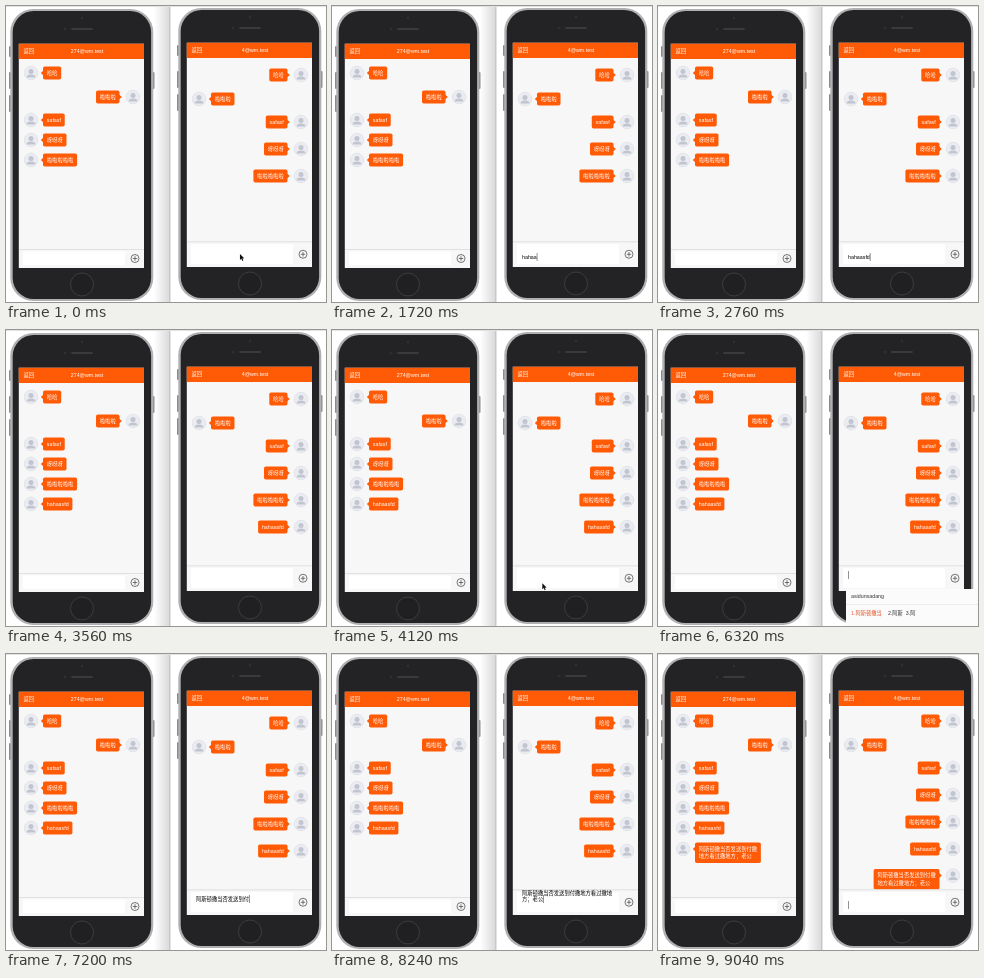
An HTML page with a canvas for the animation above (9.24 s loop, 320 by 296 pixels).

```html
<!DOCTYPE html>
<html lang="zh">
<head>
<meta charset="utf-8">
<style>
  html, body { margin: 0; width: 320px; height: 296px; overflow: hidden; background: #fff; }
  canvas { display: block; }
</style>
</head>
<body>
<canvas width="320" height="296"></canvas>
<script>
const ctx = document.querySelector('canvas').getContext('2d');
const LOOP = 9240, ORANGE = '#ff5a05', RIGHT_X = 168;
const LINES = ['阿斯顿撒当否发送到付撒', '地方看过撒地方；老公'];
const FULL = LINES.join('');

// Each message: lines, side on the left phone (mirrored on the right one), y on both phones, time sent
const messages = [
  [['哈哈'], 0, 67, 69],
  [['啦啦啦'], 1, 91, 93],
  [['safasf'], 0, 114, 116],
  [['呀呀呀'], 0, 134, 143],
  [['啦啦啦啦啦'], 0, 154, 170],
  [['hahaasfd'], 0, 174, 197, 3040],
  [LINES, 0, 195, 223.5, 8920],
];
const keyTimes = [1000, 1160, 1320, 1480, 1640, 2280, 2400, 2560];

// Pinyin compositions: start, end, letters, range of FULL, typing progress
const compositions = [
  [5360, 7200, 'asidunsadangfoufasongdaofu', 0, 10,
    [[5360, 1], [5520, 5], [6040, 6], [6400, 14], [6560, 15], [6600, 17], [6800, 18], [7160, 26]]],
  [7400, 7960, 'sadifangkanguosadifang', 10, 19, [[7400, 1], [7760, 22]]],
  [7960, 8200, 'laogong', 19, 21, [[7960, 1], [8160, 7]]],
];
const pointerPaths = [
  [0, 1000, [[0, 234, 248], [400, 216, 248], [840, 201, 247]]],
  [3600, 5360, [[3600, 232, 262], [4320, 202, 250], [4800, 201, 247]]],
];

function track(t, keys, column = 1) {
  const i = keys.findIndex(k => k[0] > t);
  if (i < 0) return keys[keys.length - 1][column];
  if (i === 0) return keys[0][column];
  const a = keys[i - 1], b = keys[i];
  return a[column] + (b[column] - a[column]) * (t - a[0]) / (b[0] - a[0]);
}

function box(x, y, w, h, color, r = 0) {
  ctx.fillStyle = color;
  ctx.beginPath();
  ctx.roundRect(x, y, w, h, r);
  ctx.fill();
}

function disc(x, y, r, fill, stroke) {
  ctx.beginPath();
  ctx.arc(x, y, r, 0, 7);
  if (fill) { ctx.fillStyle = fill; ctx.fill(); }
  if (stroke) { ctx.strokeStyle = stroke; ctx.lineWidth = 0.8; ctx.stroke(); }
}

function polygon(points, fill, stroke) {
  ctx.beginPath();
  points.forEach(p => ctx.lineTo(...p));
  ctx.closePath();
  if (stroke) { ctx.strokeStyle = stroke; ctx.lineWidth = 1; ctx.stroke(); }
  ctx.fillStyle = fill;
  ctx.fill();
}

function label(text, x, y, color = '#fff', align = 'left') {
  ctx.fillStyle = color;
  ctx.textAlign = align;
  ctx.fillText(text, x, y);
}

function avatar(x, y) {
  disc(x, y, 6.8, '#eaecf1', '#dfe1e8');
  disc(x, y - 1.5, 2.5, '#c1c5d0');
  ctx.beginPath();
  ctx.ellipse(x, y + 4.4, 4.5, 3, 0, Math.PI, 0);
  ctx.fill();
}

function bubble(lines, outgoing, y) {
  const w = ctx.measureText(lines[0]).width + 7.6;
  const x = outgoing ? 113.5 - w : 37;
  const edge = outgoing ? 113 : 37.5, tip = outgoing ? 115.8 : 34.8;
  avatar(outgoing ? 127 : 25, y);
  box(x, y - 6.5, w, 13 + (lines.length - 1) * 7.5, ORANGE, 1.8);
  polygon([[edge, y - 2.5], [tip, y], [edge, y + 2.5]], ORANGE);
  lines.forEach((line, i) => label(line, x + 3.8, y + 0.5 + i * 7.5));
}

function phone(title, barTop, rows) {
  for (const [y, h] of [[40, 11], [66, 17], [89, 17]]) box(3, y, 2, h, '#8b8b8d', 1);
  box(146.5, 66, 2, 17, '#8b8b8d', 1);
  box(4.3, 3, 143, 292, '#b0b0b2', 23);
  box(6.7, 5, 138.4, 288, '#232325', 21);
  disc(76, 12, 1.3, '#303034');
  disc(59, 23, 1.6, '#2e2e33');
  box(65, 22, 22, 2, '#3a3a3c', 1);
  disc(76, 278.5, 11.5, '#202022', '#444446');
  box(12.8, 37.7, 125.2, 224.3, '#f7f7f7');
  box(12.8, 37.7, 125.2, 15.2, ORANGE);
  label('返回', 17.5, 46);
  label(title, 81, 46, '#fff', 'center');

  ctx.save();
  ctx.beginPath();
  ctx.rect(13, 53, 125, barTop - 53);
  ctx.clip();
  rows();
  ctx.restore();

  const mid = (barTop + 262) / 2;
  box(13, barTop, 125, 0.8, '#d8d8da');
  box(17, barTop + 2.5, 102, 256.5 - barTop, '#fff', 1);
  disc(129, mid, 4, null, '#555');
  box(126.8, mid - 0.4, 4.4, 0.8, '#555');
  box(128.6, mid - 2.2, 0.8, 4.4, '#555');
}

function inputText(t) {
  const entered = keyTimes.filter(k => k <= t).length;
  const latin = t < 3040;
  let text = latin ? 'hahaasfd'.slice(0, entered) : '';
  if (t < 8920) {
    for (const [, end, , from, to] of compositions) if (t >= end) text += FULL.slice(from, to);
  }
  const lines = [text.slice(0, 17), text.slice(17)].filter((s, i) => s || !i);
  const y = latin || t >= 8920 ? 251 : 245;
  lines.forEach((s, i) => label(s, 190, y + 1 - (lines.length - 1 - i) * 6.3, '#000'));

  const caretX = 190 + ctx.measureText(lines[lines.length - 1]).width;
  const caretOn = (t >= 920 && t < 3040) || (t >= 4440 && t < 8720) || t >= 8920;
  if (caretOn) box(caretX, y - 4, 0.7, 8, '#666');

  const active = compositions.find(c => t >= c[0] && t < c[1]);
  if (active) candidates(t, caretX, active);
}

function candidates(t, x, [, , letters, from, to, progress]) {
  const typed = Math.floor(track(t, progress));
  const phrase = FULL.slice(from, from + Math.ceil((to - from) * typed / letters.length));
  box(x - 2, 259, 330 - x, 40, '#fbfbfb', 2);
  box(x - 2, 274, 330 - x, 0.6, '#ddd');
  label(letters.slice(0, typed), x + 3, 267, '#333');
  label('1.' + phrase, x + 3, 284, '#e0562a');
  const next = x + 9 + ctx.measureText('1.' + phrase).width;
  label(`2.${phrase.slice(0, 2)}  3.${phrase[0]}`, next, 284, '#333');
}

function pointer(t) {
  const path = pointerPaths.find(p => t >= p[0] && t < p[1]);
  if (!path) return;
  const x = track(t, path[2], 1), y = track(t, path[2], 2);
  const shape = [[0, 0], [0, 6], [1.4, 4.8], [2.4, 7], [3.4, 6.5], [2.5, 4.4], [4.3, 4.2]];
  polygon(shape.map(([px, py]) => [x + px, y + py]), '#111', '#fff');
}

function backdrop() {
  box(0, 0, 320, 296, '#fff');
  const shade = ctx.createLinearGradient(148, 0, 164, 0);
  shade.addColorStop(0, '#fff');
  shade.addColorStop(1, '#d8d8d8');
  box(148, 0, 16, 296, shade);
  box(163, 0, 1.5, 296, '#c8c8c8');
  box(0, 0, 320, 1, '#e2e2e2');
}

function draw(t) {
  ctx.font = '5.3px "Liberation Sans", "Noto Sans CJK SC", "Noto Sans CJK", sans-serif';
  ctx.textBaseline = 'middle';
  backdrop();

  phone('274@wm.test', 243, () => {
    for (const [lines, out, y, , sent = -LOOP] of messages) {
      if (t >= sent + 40) bubble(lines, out, y);
    }
  });

  const scroll = track(t, [[8920, 0], [9040, 2]]);
  ctx.save();
  ctx.translate(RIGHT_X, -1);
  phone('4@wm.test', 236.5, () => {
    for (const [lines, out, , y, sent = -LOOP] of messages) {
      if (t >= sent) bubble(lines, !out, y + 1 - scroll);
    }
  });
  ctx.restore();

  inputText(t);
  pointer(t);
}

const start = performance.now();
function tick() {
  draw((performance.now() - start) % LOOP);
  requestAnimationFrame(tick);
}
tick();
</script>
</body>
</html>
```
